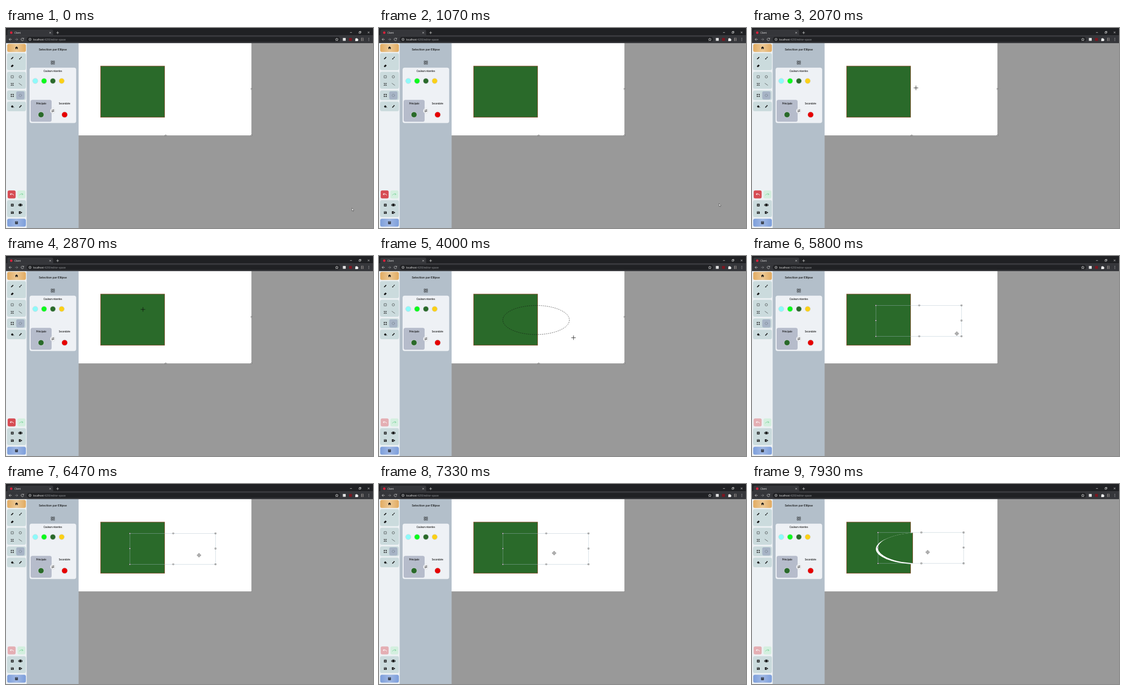
Write an HTML page that moves like this. It is 700 by 382 pixels and loops after 8000 ms.

```html
<!DOCTYPE html>
<html lang="fr">
<head>
<meta charset="utf-8">
<title>Client</title>
<style>
  html, body { margin: 0; width: 100%; height: 100%; overflow: hidden; background: #999; }
  svg { display: block; width: 100%; height: 100%; }
  .chrome { font-family: "Open Sans", "Noto Sans", sans-serif; font-size: 4.8px; }
  .page { font-family: Lato, "Open Sans", sans-serif; font-size: 4.8px; font-weight: 500; letter-spacing: -.035em; text-anchor: middle; fill: #111; }
  .line { fill: none; stroke: #111; stroke-width: .8; }
  .thin { fill: none; stroke: #111; stroke-width: .55; }
  .light { fill: none; stroke: #ddd; stroke-width: .7; }
  .group { fill: #cbdbdd; }
  .shape { fill: #2a6a2a; stroke: #8c4c2c; stroke-width: .9; }
  .grip { fill: #fff; stroke: #333; stroke-width: .5; }
</style>
</head>
<body>
<svg viewBox="0 0 700 382">
  <defs>
    <linearGradient id="orange"><stop offset="0" stop-color="#e2ab61"/><stop offset=".5" stop-color="#ecc996"/><stop offset="1" stop-color="#e2ab61"/></linearGradient>
    <linearGradient id="blue"><stop offset="0" stop-color="#7c9edb"/><stop offset=".5" stop-color="#a0b8e4"/><stop offset="1" stop-color="#7c9edb"/></linearGradient>
    <clipPath id="lens"><ellipse cx="318" cy="124" rx="81.8" ry="29.5"/></clipPath>
  </defs>

  <!-- drawing area -->
  <rect width="700" height="382" fill="#999"/>
  <rect x="138" y="28" width="331" height="178" fill="#666"/>
  <rect x="138" y="28" width="330.4" height="177.4" fill="#fff"/>
  <rect class="shape" x="180.5" y="72.8" width="122" height="97.6"/>
  <g id="cut">
    <ellipse cx="318" cy="124" rx="81.8" ry="29.5" fill="#fff"/>
    <g id="piece"><g clip-path="url(#lens)">
      <rect x="230" y="90" width="180" height="70" fill="#fff"/>
      <rect class="shape" x="180.5" y="72.8" width="122" height="97.6"/>
    </g></g>
  </g>
  <g id="sizers"></g>
  <ellipse id="lasso" fill="none" stroke="#111" stroke-width=".6" stroke-dasharray="2.2 1.6"/>
  <g id="box">
    <rect x="236.2" y="94.5" width="163.6" height="59" fill="none" stroke="#a9bcc8" stroke-opacity=".75" stroke-width=".6"/>
  </g>

  <!-- browser frame -->
  <rect width="700" height="14.5" fill="#202124"/>
  <path d="M0 14.5q2.5 0 2.5-2.5V6q0-3 3-3H87q3 0 3 3v6q0 2.5 2.5 2.5z" fill="#35363a"/>
  <rect y="14.3" width="700" height="14.6" fill="#35363a"/>
  <rect x="39.5" y="17" width="598" height="9.4" rx="4.7" fill="#202124"/>
  <circle cx="10" cy="9" r="2.4" fill="#d8203a"/>
  <g class="chrome">
    <text x="16" y="10.7" fill="#e6e6e6" font-size="4.6">Client</text>
    <text x="51.8" y="23.5" fill="#9a9da1"><tspan fill="#f1f1f1">localhost</tspan>:4200/editor-space</text>
  </g>
  <path class="light" d="M82.8 7.5l3 3m0-3l-3 3M96 9h5m-2.5-2.5v5M656.2 8.6h3.6M673.2 7.4h2.8v2.8h-2.8zM674.2 7.4v-1h2.8v2.8h-1M690 6.9l3.2 3.2m0-3.2l-3.2 3.2"/>
  <path class="light" d="M11 21.8H5.8m2.5-2.5l-2.5 2.5 2.5 2.5"/>
  <path class="light" stroke-opacity=".55" d="M17.2 21.8h5.2m-2.5-2.5l2.5 2.5-2.5 2.5"/>
  <path class="light" d="M33.4 20.4a2.5 2.5 0 1 0 .3 2M33.8 18.8v2h-2"/>
  <circle class="light" cx="45.8" cy="21.8" r="2.2"/>
  <path class="light" d="M45.8 21.4v1.6m0-2.8v.6"/>
  <path class="light" d="M631 19.2l.8 1.8 2 .2-1.5 1.3.5 2-1.8-1.1-1.8 1.1.5-2-1.5-1.3 2-.2z"/>
  <rect x="642.5" y="19" width="5.5" height="5.5" rx=".6" fill="#dedede"/>
  <rect x="654.3" y="19" width="5.5" height="5.5" rx=".6" fill="#7c1620"/>
  <path d="M666 20.3h1.5a1.1 1.1 0 0 1 2.2 0h1.5v1.5a1 1 0 0 1 0 2v1.2h-5.2v-1.5a1 1 0 0 0 0-1.8z" fill="#eee"/>
  <rect x="677.5" y="18.5" width="4.5" height="6.5" rx="1" fill="#85817f"/>
  <rect x="679.3" y="18.5" width="1.4" height="6.5" fill="#35363a"/>
  <g fill="#ddd"><circle cx="692" cy="19.6" r=".6"/><circle cx="692" cy="21.8" r=".6"/><circle cx="692" cy="24" r=".6"/></g>

  <!-- tool bar -->
  <rect y="28.9" width="40" height="354" fill="#edf1f4"/>
  <rect x="2.3" y="30.3" width="35.6" height="15.4" rx="3.5" fill="url(#orange)"/>
  <rect class="group" x="2" y="48" width="36" height="32.6" rx="3.5"/>
  <rect class="group" x="2" y="83.5" width="36" height="32.6" rx="3.5"/>
  <rect class="group" x="2" y="119.3" width="36" height="18.4" rx="3.5"/>
  <rect class="group" x="2" y="140.6" width="36" height="18.4" rx="3.5"/>
  <rect class="group" x="2" y="328.7" width="36" height="32.6" rx="3.5"/>
  <rect x="19.5" y="121" width="15.8" height="15.6" rx="3" fill="#a7b4c6"/>
  <rect x="2.3" y="364.2" width="35.6" height="15.2" rx="3.5" fill="url(#blue)"/>
  <rect id="undo" x="3.2" y="310.2" width="15.2" height="15.2" rx="3" fill="#d64c53"/>
  <rect x="21.8" y="310.2" width="15.2" height="15.2" rx="3" fill="#d4efdf"/>
  <path d="M8 317.5q3.5-2.2 7 2M9.8 315.8l-2 1.8 2.4 1.2" fill="none" stroke="#fff" stroke-width="1"/>
  <path d="M32.3 317.5q-3.5-2.2-7 2M30.5 315.8l2 1.8-2.4 1.2" fill="none" stroke="#7bd39b" stroke-width=".9"/>
  <g fill="#111">
    <path d="M17.2 37.8l2.9-2.5 2.9 2.5h-.7v2.4h-1.5v-1.6h-1.4v1.6H18v-2.4z"/>
    <path d="M9.5 59.8l.4-1.6 3.2-3.2 1.2 1.2-3.2 3.2z"/>
    <path d="M25 60q.2-2.4 1.8-2.5l.9.8q-.3 1.9-2.7 1.7zM27.2 57l2.2-2.3.9.8-2.2 2.3z"/>
    <path d="M9.3 72.8l3-3 2.4 1.9-2.7 2.8H10z"/>
    <path d="M9.4 150l2.5-2.5 2.6 2.5-2.5 2.4zM14.8 150.5q1.2 1.6 0 1.9-1.1-.3 0-1.9z"/>
    <path d="M25 152.3l.4-1.5 2.3-2.2 1 1-2.2 2.3zM27.6 148.2l1.2-1.1 1.3 1.2-1.1 1.2z"/>
    <path d="M9.5 335.7h5v5h-5zm2.1 1v1.1h-1.1v.8h1.1v1.1h.8v-1.1h1.1v-.8h-1.1v-1.1z" fill-rule="evenodd"/>
    <path d="M25.4 335.6h4v5h-4zM23.6 336.4h1.2v3.4h-1.2zM30 336.4h1.2v3.4H30z"/>
    <path d="M9.5 350.2h4.2l.9.9v4h-5.1zm.8.7v1.2h2.8v-1.2zm1.7 2a.8.8 0 1 0 .1 0z" fill-rule="evenodd"/>
    <path d="M24.6 350h3.7v1.5h-1.7v2h1.7v1.6h-3.7zM27.1 352h1.8v-1.2l2 1.7-2 1.8V353h-1.8z"/>
    <path d="M17.5 369.3h5v5.2h-5zm.8.8v1h3.4v-1zm0 2.5v.6h3.4v-.6z" fill-rule="evenodd"/>
    <path d="M9.2 125.9h1.5v1.5H9.2zM13.2 125.9h1.5v1.5h-1.5zM9.2 129.9h1.5v1.5H9.2zM13.2 129.9h1.5v1.5h-1.5z"/>
    <path d="M9.2 105.2h1.1v1.1H9.2zM9.2 108.9h1.1v1.1H9.2zM13.5 105.2h1.1v1.1h-1.1zM13.5 108.9h1.1v1.1h-1.1z"/>
  </g>
  <path class="thin" d="M9.7 91h4.4v4.3H9.7zM24.4 105.4l6 4.3M10 105.8h4l-1.2 2 1.2 1.8h-4l.8-1.8zM10 126.6h4v4.2h-4z"/>
  <circle class="thin" cx="27.3" cy="93.2" r="2.3"/>
  <circle class="thin" cx="27.3" cy="128.7" r="2.4" stroke-dasharray="1 .8" stroke-opacity=".7"/>

  <!-- settings panel -->
  <rect x="39.4" y="28.9" width="99.1" height="354" fill="#b3bfca"/>
  <path class="line" d="M86 62.9h6.6v6.4H86z" stroke-dasharray="1.1 .5"/>
  <path class="line" d="M87.7 64.5h3.2v3.1h-3.2z"/>
  <rect x="45" y="75.8" width="88.8" height="105.6" rx="4" fill="#eef1f5"/>
  <rect x="47" y="137.2" width="40" height="41.8" rx="3.5" fill="#b6bccb"/>
  <g class="page">
    <text x="89.2" y="42.8" font-size="6.5">Selection par Ellipse</text>
    <text x="89" y="84.1">Couleurs récentes</text>
    <text x="67" y="146.1">Principale</text>
    <text x="111.6" y="146.1">Secondaire</text>
  </g>
  <g id="swatches"></g>
  <circle cx="89.4" cy="158.2" r="5" fill="#f5f6f8" stroke="#ccd0d6" stroke-width=".5"/>
  <path class="line" d="M86.8 157h5m-1.4-1.3l1.4 1.3M92 159.4h-5m1.4 1.3l-1.4-1.3"/>

  <!-- pointers -->
  <path id="arrow" d="M-1.2-3.2v5.5l1.3-1.1.9 2 .9-.4-.9-1.9h1.7z" fill="#fff" stroke="#222" stroke-width=".5"/>
  <path id="cross" class="line" d="M-4.3 0h8.6M0-4.3v8.6"/>
  <path id="move" d="M0-4l1.6 1.7H.6v1.7h1.7v-1L4 0 2.3 1.6v-1H.6v1.7h1L0 4l-1.6-1.7h1V.6h-1.7v1L-4 0l1.7-1.6v1h1.7v-1.7h-1z" fill="#ddd" stroke="#666" stroke-width=".6"/>
</svg>
<script>
const LOOP = 8000, FPS = 15;
const PRESS = 3200, RELEASE = 5000, SELECT = 5130, GRAB = 7600;
const START = [236.2, 94.5], END = [399.8, 153.5], OFF = [5, 6];
const path = [
  [0, 661, 347], [1000, 661, 347], [1300, 610, 308], [1600, 470, 206],
  [1850, 362, 137], [2070, 312, 114], [2400, 292, 108], [2870, 261, 102],
  [3130, 241, 100.3], [3270, 241, 100.3], [3600, 312, 137], [3930, 368, 156],
  [4000, 371, 156], [4400, 394, 158.5], [4730, 405, 159.5], [5300, 405, 159.5],
  [5700, 394, 150], [6470, 368, 136], [7100, 340, 132], [7450, 331, 132],
  [7600, 331, 132], [7930, 335, 130.3], [8000, 335.5, 130]
];
const $ = id => document.getElementById(id);
const clamp = k => Math.max(0, Math.min(1, k));

function add(parent, tag, attrs) {
  const el = document.createElementNS("http://www.w3.org/2000/svg", tag);
  for (const k in attrs) el.setAttribute(k, attrs[k]);
  $(parent).append(el);
}
const grip = (parent, x, y) =>
  add(parent, "rect", { class: "grip", x: x - 1.1, y: y - 1.1, width: 2.2, height: 2.2 });
const swatch = (x, y, r, fill) =>
  add("swatches", "circle", { cx: x, cy: y, r, fill, stroke: "#d3d8de", "stroke-width": .8 });

for (const [x, y] of [[468.3, 116.5], [304.8, 205.5], [468.3, 205.5]]) grip("sizers", x, y);
for (let i = 0; i < 9; i++) {
  if (i !== 4) grip("box", START[0] + (i % 3) * 81.8 + (i % 3 === 1 ? 1 : 0), START[1] + Math.floor(i / 3) * 29.5 - (i > 2 && i < 6 ? .8 : 0));
}
["#8dfafa", "#0bfa1c", "#2a6a2a", "#fbd016"].forEach((c, i) => swatch(55.8 + i * 16.8, 101.1, 5.2, c));
swatch(66.8, 165.6, 5.5, "#2a6a2a");
swatch(111.8, 165.6, 5.5, "#e60000");

function pos(t) {
  let i = 1;
  while (i < path.length - 1 && path[i][0] < t) i++;
  const [a, x, y] = path[i - 1], [b, u, v] = path[i];
  const k = clamp((t - a) / (b - a));
  return [x + (u - x) * k, y + (v - y) * k];
}
const show = (id, on) => $(id).setAttribute("opacity", +on);
const shift = (id, x, y) => $(id).setAttribute("transform", `translate(${x} ${y})`);

function draw(t) {
  const [x, y] = pos(t);
  const selected = t >= SELECT, grabbed = t >= GRAB;

  // the outline follows the pointer one step late
  const late = pos(t - 1000 / FPS);
  const w = Math.max(0, Math.min(END[0], late[0] - OFF[0]) - START[0]);
  const h = Math.max(0, Math.min(END[1], late[1] - OFF[1]) - START[1]);
  const lasso = { cx: START[0] + w / 2, cy: START[1] + h / 2, rx: w / 2, ry: h / 2 };
  for (const k in lasso) $("lasso").setAttribute(k, lasso[k]);

  const left = 1 - clamp((t - RELEASE) / (SELECT - RELEASE));
  show("lasso", t >= PRESS ? left : 0);
  show("sizers", left);
  show("box", selected);
  show("cut", grabbed);

  const from = pos(GRAB);
  const dx = grabbed ? x - from[0] : 0, dy = grabbed ? y - from[1] : 0;
  shift("box", dx, dy);
  shift("piece", dx, dy);

  $("undo").setAttribute("fill-opacity", 1 - .6 * clamp((t - PRESS) / 200));

  const hx = x - OFF[0], hy = y - OFF[1];
  const inBox = selected && hx < END[0] - 2 && hy < END[1] - 2;
  const inPage = x < 469 && y < 206;
  const kind = inBox ? "move" : inPage ? "cross" : "arrow";
  for (const id of ["arrow", "cross", "move"]) {
    show(id, id === kind);
    shift(id, x, y);
  }
}

const t0 = performance.now();
function tick(now) {
  const t = Math.max(0, now - t0) % LOOP;
  draw(Math.floor((t + 5) * FPS / 1000) * 1000 / FPS);
  requestAnimationFrame(tick);
}
draw(0);
requestAnimationFrame(tick);
</script>
</body>
</html>
```
